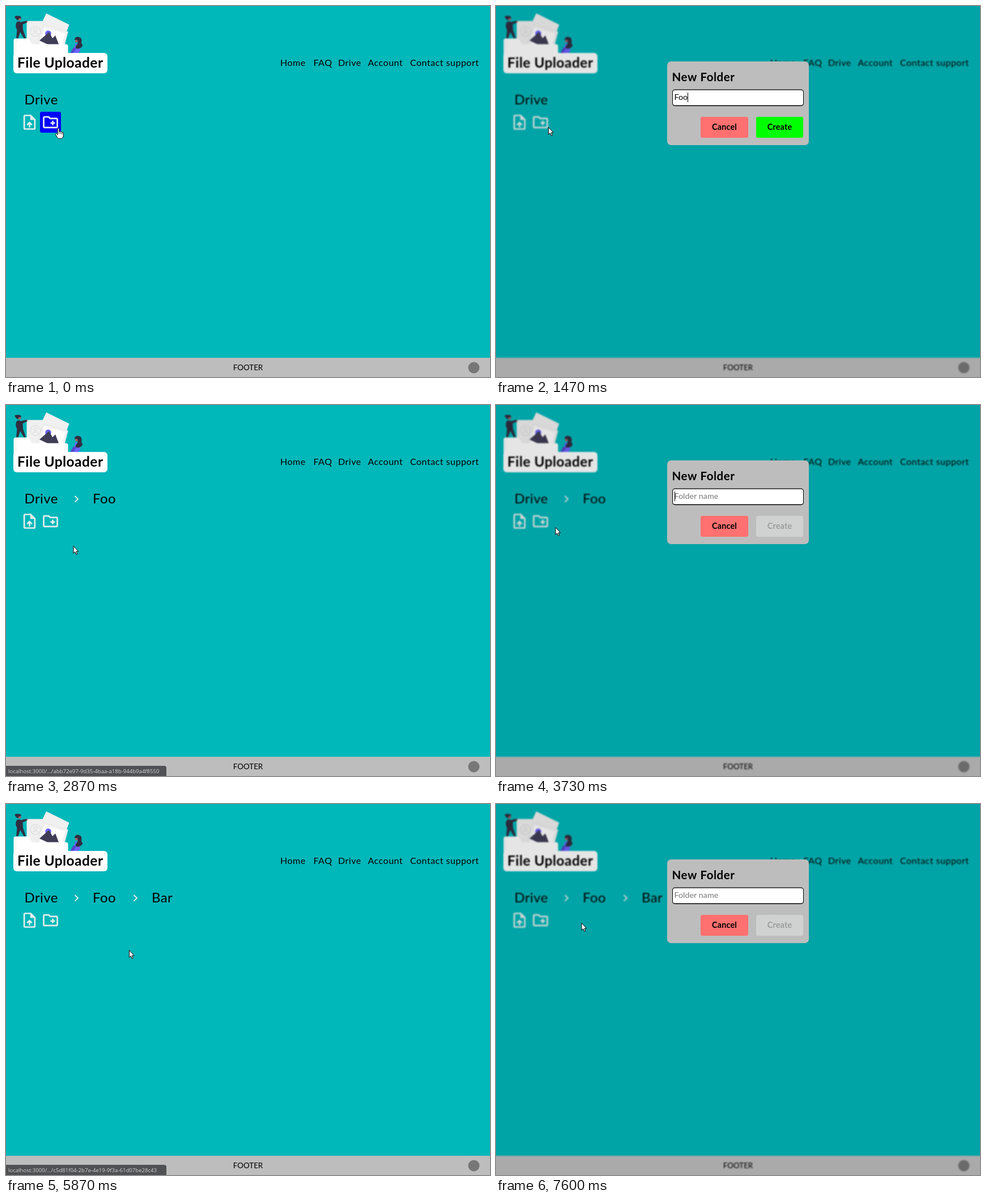
An HTML page with a canvas that plays this animation: 854 px wide and 656 px high, repeating every 8 s.

```html
<!DOCTYPE html>
<html lang="en">
<head>
<meta charset="utf-8">
<title>File Uploader</title>
<style>
  html, body { margin: 0; width: 100%; height: 100%; overflow: hidden; background: #00b7b9; }
  canvas { display: block; }
</style>
</head>
<body>
<canvas id="stage" width="854" height="656"></canvas>
<script>
const canvas = document.getElementById('stage');
const ctx = canvas.getContext('2d');
const LOOP = 8000, TICK = 200 / 3;
const INK = '#2f2e41', VIOLET = '#6c63ff', SKIN = '#a0616a', ICON = '#e6eeee';
const SANS = 'Lato, "Open Sans", sans-serif';

const uploadIcon = new Path2D('M14 2H6c-1.1 0-2 .9-2 2v16c0 1.1.9 2 2 2h12c1.1 0 2-.9 2-2V8zM18 20H6V4h7v5h5zM8 15l1.4 1.4 1.6-1.6V19h2v-4.2l1.6 1.6L16 15l-4-4z');
const plainFolder = 'M20 6h-8l-2-2H4c-1.1 0-2 .9-2 2v12c0 1.1.9 2 2 2h16c1.1 0 2-.9 2-2V8c0-1.1-.9-2-2-2zM20 18H4V6h5.2l2 2H20z';
const folderIcon = new Path2D(plainFolder);
const newFolderIcon = new Path2D(plainFolder + 'M12 14h2v2h2v-2h2v-2h-2v-2h-2v2h-2z');
const arrow = new Path2D('M0 .5V13.2L2.900 10.600 4.900 15.300 6.900 14.500 5 9.900H8.800Z');
const hand = new Path2D('M-1.4 1.6C-1.4 -.4 1.4 -.4 1.4 1.6V6.4C2.2 5.4 4 5.6 4.2 6.8 5 6 6.6 6.3 6.7 7.6 7.7 7 8.7 7.6 8.7 9V13C8.7 16 6.8 18.5 4 18.5H1.5C-.6 18.5 -1.5 17 -2.6 15.2L-5 11.4C-5.7 9.9 -4 8.9 -2.8 10L-1.4 11.6Z');

// When each state of the page begins
const states = [
  { at: 0, path: ['Drive'] },
  { at: 200, input: '' },
  { at: 1333, input: 'F' },
  { at: 1400, input: 'Fo' },
  { at: 1467, input: 'Foo' },
  { at: 1667, ring: true },
  { at: 1733, row: 'Foo' },
  { at: 2800, path: ['Drive', 'Foo'] },
  { at: 3733, input: '' },
  { at: 4467, input: 'B' },
  { at: 4667, input: 'Ba' },
  { at: 4733, input: 'Bar' },
  { at: 4800, ring: true },
  { at: 4867, row: 'Bar' },
  { at: 5867, path: ['Drive', 'Foo', 'Bar'] },
  { at: 7133, input: '' }
];

// Pointer stops: time, x, y
const stops = [
  [0, 92.5, 214], [2270, 92.5, 214], [2333, 99, 224], [2410, 99, 224],
  [2667, 119, 249], [3270, 119, 249], [3530, 95, 215], [3667, 95, 215],
  [3733, 105, 216], [4067, 287, 174], [5070, 287, 174], [5200, 266, 165],
  [5340, 266, 165], [5667, 215, 256], [5800, 215, 256], [6000, 224, 264],
  [6140, 224, 264], [6800, 92, 214], [7000, 93, 214], [7067, 97, 215],
  [7134, 99, 215], [7333, 151, 210], [LOOP, 151, 210]
];

const links = [
  { from: 2467, to: 3200, id: 'abb72e97-9d35-4baa-a18b-944b9a4f8550' },
  { from: 5600, to: 6000, id: 'c5d81f04-2b7e-4e19-9f3a-61d07be28c43' }
];

const within = (t, a, b) => t >= a && t < b;

function pointerAt(t) {
  const i = Math.max(1, stops.findIndex(s => s[0] > t));
  const [t0, x0, y0] = stops[i - 1], [t1, x1, y1] = stops[i];
  const k = Math.min(1, Math.max(0, (t - t0) / (t1 - t0)));
  const e = t1 - t0 > 150 ? k * k * (3 - 2 * k) : k;
  return { x: x0 + (x1 - x0) * e, y: y0 + (y1 - y0) * e };
}

function stateAt(t) {
  let path, now;
  for (const s of states) {
    if (s.at > t) break;
    now = s;
    path = s.path || path;
  }
  return { ...now, path };
}

function box(x, y, w, h, r, color) {
  ctx.fillStyle = color;
  ctx.beginPath();
  ctx.roundRect(x, y, w, h, r);
  ctx.fill();
}

function disc(x, y, r, color) {
  ctx.fillStyle = color;
  ctx.beginPath();
  ctx.arc(x, y, r, 0, Math.PI * 2);
  ctx.fill();
}

function shape(d, fill, line, width = 1) {
  const p = new Path2D(d);
  if (fill) { ctx.fillStyle = fill; ctx.fill(p); }
  if (line) {
    ctx.strokeStyle = line;
    ctx.lineWidth = width;
    ctx.stroke(p);
  }
}

function text(str, x, y, size, { weight = 400, color = '#000', gap = 0, align = 'left', font = SANS } = {}) {
  ctx.font = `${weight} ${size}px ${font}`;
  ctx.letterSpacing = gap + 'px';
  ctx.textAlign = align;
  ctx.fillStyle = color;
  ctx.fillText(str, x, y);
  return ctx.measureText(str).width;
}

function icon(path, x, y, scale = 4 / 3) {
  ctx.save();
  ctx.translate(x, y);
  ctx.scale(scale, scale);
  ctx.fillStyle = ICON;
  ctx.fill(path, 'evenodd');
  ctx.restore();
}

function artwork() {
  // cards
  shape('M71 13L111.500 33 101 62 58 41Z', '#f0f0f0');
  shape('M36.500 28Q36.500 26.500 38 26.500H66V70H36.500Z', '#f0f0f0');
  shape('M43 45a9 9 0 1 0 18 0a9 9 0 1 0 -18 0M49 42.500a3 3 0 1 0 6 0a3 3 0 1 0 -6 0M46 51Q52 43.500 58 51', null, '#dadada', 1);
  shape('M66 33L109.500 45.500 103 70H54Z', '#f2f2f2', '#dcdcdc', .6);
  shape('M68 38L104 48.500 99 68H60Z', '#fff');
  disc(74.5, 48.5, 5.3, VIOLET);
  shape('M59 61L76 46 82 57 87 52 94 70H78Z', '#3f3d56');
  // left figure
  shape('M18.500 29Q22 26 26 28.500L36.500 26 37.500 29 29.500 32.500 30 42 35 57H31.500L25 46 21.500 57H18L19.500 42Q15.500 36 18.500 29Z', INK);
  disc(23.8, 23, 2.8, SKIN);
  shape('M15 19Q18 16.500 22 17.500Q27 17.500 27 21L22.500 22 21 25.500 18 23.500Z', INK);
  disc(37, 27.5, 1.3, SKIN);
  // right figure
  shape('M122 66L130 68 131 80 126 84H114L118 79 121 72Z', VIOLET);
  shape('M119 73L113.500 83H119L124 75Z', '#5149cf');
  disc(124.5, 61.5, 2.8, SKIN);
  shape('M121 60Q121 54.500 127 54.500Q134 55 133.500 62Q132 67 135.500 69Q133 76 125 75.500Q121 74 124 70Q128 66 126 60Z', INK);
  // folder and name plate
  shape('M13.500 90V61Q13.500 57.500 17 57.500H38Q40 57.500 41 59L45.500 67.500H106Q109.500 67.500 109.500 71V90Z', '#fff');
  shape('M17.500 83V63Q17.500 60.500 20 60.500', null, '#ececec', 1);
  box(13, 83, 166, 36, 6, '#fff');
  text('File Uploader', 20, 108.5, 24.5, { weight: 700, gap: .45 });
}

function toolbar(blue, ring) {
  if (ring) {
    box(58, 185, 41, 41, 5, '#fff');
    box(59, 186, 39, 39, 4, '#000');
    box(61, 188, 35, 35, 2.5, '#00f');
  } else if (blue) {
    box(60, 187, 37, 37, 3, '#00f');
  }
  icon(uploadIcon, 25.5, 189.5);
  icon(newFolderIcon, 62.5, 189.5);
}

function page(s, blue) {
  ctx.fillStyle = '#00b7b9';
  ctx.fillRect(0, 0, 854, 656);
  artwork();

  const nav = [['Home', 484], ['FAQ', 542.5], ['Drive', 586], ['Account', 638.5], ['Contact support', 713]];
  for (const [label, x] of nav) text(label, x, 106, 16, { gap: .5 });

  const crumbX = [32.5, 153, 257];
  s.path.forEach((name, i) => {
    text(name, crumbX[i], 174, 24, { gap: .4 });
    if (i) shape(`M${17.5 + 104 * i} 161l5.500 5.300l-5.500 5.300`, null, ICON, 1.9);
  });
  toolbar(blue, s.ring);

  if (s.row) {
    icon(folderIcon, 29, 239, 1);
    text(s.row, 61, 256.5, 16, { gap: .3 });
    ctx.fillStyle = 'rgba(255,255,255,.35)';
    ctx.fillRect(16, 271, 822, 1);
  }

  ctx.fillStyle = '#bdbdbd';
  ctx.fillRect(0, 622, 854, 34);
  text('FOOTER', 427, 643.5, 13.4, { align: 'center' });
  disc(825.5, 639.5, 10, '#777');
}

function button(label, x, w, fill, color) {
  box(x, 196, w, 37, 3, fill);
  text(label, x + w / 2, 219, 14.4, { weight: 700, color, gap: .15, align: 'center' });
}

function dialog(value, caret) {
  // soft, darkened backdrop
  ctx.filter = 'blur(0.8px)';
  ctx.drawImage(canvas, 0, 0);
  ctx.filter = 'none';
  ctx.fillStyle = 'rgba(0,0,0,.1)';
  ctx.fillRect(0, 0, 854, 656);

  box(302, 98, 250, 148, 7, '#bdbdbd');
  text('New Folder', 310.5, 133, 20.5, { weight: 700, gap: .55 });
  box(311, 147.5, 232, 29.5, 5, '#000');
  box(312, 148.7, 230, 26.8, 4, '#fff');

  const w = text(value || 'Folder name', 314.5, 166, 14.3, { color: value ? '#000' : '#777' });
  if (caret) {
    ctx.fillStyle = '#000';
    ctx.fillRect(value ? Math.round(314.5 + w) : 315, 153, 1, 17);
  }
  button('Cancel', 361, 84, '#ff7070', '#000');
  if (value) button('Create', 459, 83, '#0f0', '#000');
  else button('Create', 459, 83, '#cfd2d1', '#9b9e9d');
}

function pointer({ x, y }, pointing) {
  ctx.save();
  ctx.translate(x, y + (pointing ? 2 : 0));
  const p = pointing ? hand : arrow;
  ctx.lineJoin = 'round';
  ctx.fillStyle = '#fff';
  ctx.fill(p);
  ctx.strokeStyle = '#000';
  ctx.lineWidth = 1;
  ctx.stroke(p);
  if (pointing) shape('M1.4 6.500V10M4.100 7V10.500M6.500 8V11', null, '#000', .8);
  ctx.restore();
}

function draw(t) {
  const s = stateAt(t), at = pointerAt(t);
  const open = s.input !== undefined;
  const overButton = within(at.x, 60, 97.5) && within(at.y, 187, 223.5);
  const overRow = s.row && within(at.y, 233, 272);
  const pressed = within(t, 66, 200) || within(t, 7066, 7133);

  page(s, !open && overButton);
  const link = links.find(l => within(t, l.from, l.to));
  if (link) {
    box(0, 638, 283, 20, [0, 4, 0, 0], '#505154');
    text('localhost:3000/.../' + link.id, 4, 651, 9.6, { color: '#d2d3d5', font: '"Open Sans", "Noto Sans", sans-serif' });
  }
  if (open) {
    const hidden = within(t, 733, 1267) || within(t, 4267, 4467) || t >= 7600;
    dialog(s.input, !hidden);
  }
  pointer(at, !open && !pressed && (overButton || overRow));
}

let last = -1;
const start = performance.now();
function loop() {
  const t = (performance.now() - start) % LOOP;
  const n = Math.floor((t + 4) / TICK) % (LOOP / TICK);
  if (n !== last) draw(n * TICK + 1);
  last = n;
  requestAnimationFrame(loop);
}
loop();
</script>
</body>
</html>
```
